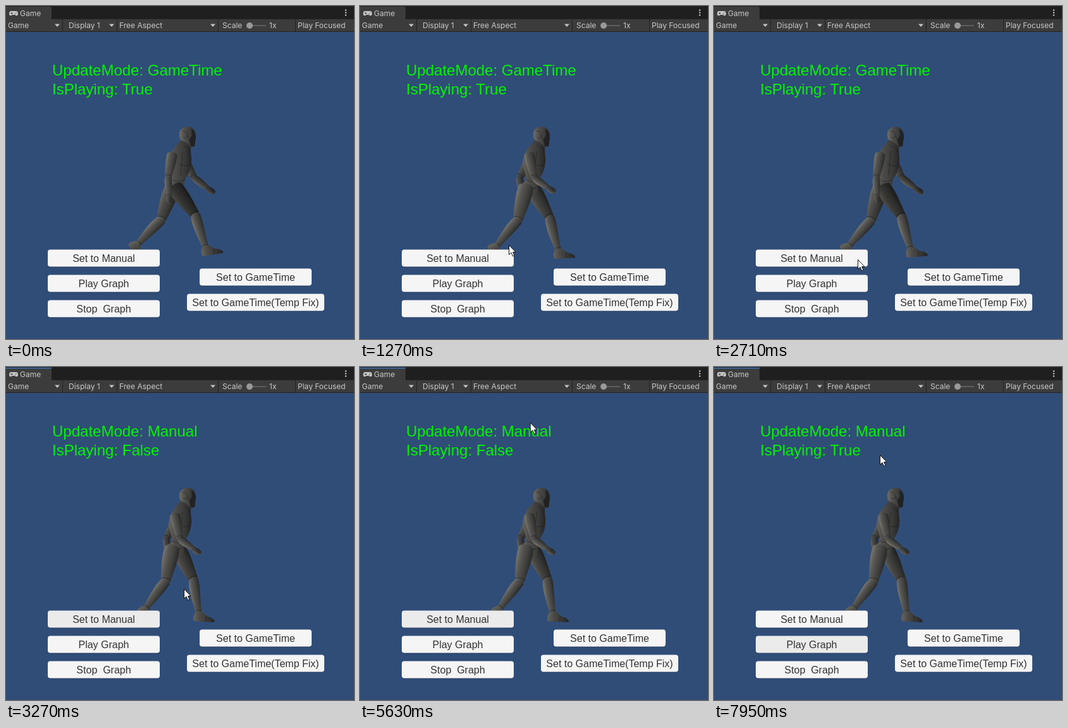
These frames come from a looping animation (550x527 px, 7990 ms). An HTML page:

```html
<!DOCTYPE html>
<html lang="en">
<head>
<meta charset="utf-8">
<title>Game view</title>
<style>
html, body { margin: 0; width: 100%; height: 100%; overflow: hidden; background: #304d78; }
svg { display: block; width: 100vw; height: 100vh; }
.ui { font: 12px Inter, Roboto, sans-serif; fill: #c8c8c8; }
.info { font: 24px "Liberation Sans", Arial, sans-serif; fill: #00f400; }
.btn text { font: 16px "Liberation Sans", Arial, sans-serif; fill: #323232; text-anchor: middle; white-space: pre; }
.crease { fill: none; stroke: #1d1d1d; stroke-width: 1; opacity: .55; }
</style>
</head>
<body>
<svg viewBox="0 0 550 527" preserveAspectRatio="none">
  <defs>
    <linearGradient id="skin">
      <stop offset="0" stop-color="#77766f"/><stop offset=".3" stop-color="#575652"/>
      <stop offset=".7" stop-color="#3e3e3c"/><stop offset="1" stop-color="#282828"/>
    </linearGradient>
    <linearGradient id="trunk">
      <stop offset="0" stop-color="#6e6d67"/><stop offset=".35" stop-color="#4d4c49"/>
      <stop offset=".75" stop-color="#383837"/><stop offset="1" stop-color="#242425"/>
    </linearGradient>
  </defs>

  <rect width="550" height="527" fill="#304d78"/>
  <rect width="550" height="20" fill="#1f1f1f"/>
  <path d="M0 20V1H69Q72 1 72 4V20Z" fill="#3c3c3c"/>
  <rect id="focus" y="1" width="72" height="1.5" fill="#3a72b0"/>
  <rect y="20" width="550" height="20.5" fill="#3c3c3c"/>
  <path d="M72 20.5H550M0 40.5H550M89.5 21V40M175.5 21V40M335.5 21V40M457.5 21V40" stroke="#232323"/>
  <path d="M8 8H16Q19 8 19 12T15.500 15L14 14H10L8.500 15Q5 16 5 12T8 8Z" fill="#c4c4c4"/>
  <path d="M7.500 11.500H10.500M9 10V13M14 12.500H15M15.500 10.500H16.500" stroke="#3c3c3c"/>
  <g fill="#c4c4c4">
    <circle cx="537" cy="6.500" r="1.200"/><circle cx="537" cy="10.500" r="1.200"/><circle cx="537" cy="14.500" r="1.200"/>
    <path d="M77 28.500h8l-4 4.500zM163 28.500h8l-4 4.500zM323 28.500h8l-4 4.500z"/>
  </g>
  <path d="M385 31H411" stroke="#5e5e5e" stroke-width="2"/>
  <circle cx="385" cy="31" r="5" fill="#999"/>
  <g class="ui">
    <text x="22" y="16">Game</text><text x="3" y="35">Game</text><text x="99" y="35">Display 1</text>
    <text x="179" y="35">Free Aspect</text><text x="342" y="35">Scale</text><text x="416" y="35">1x</text>
    <text x="461" y="35">Play Focused</text>
  </g>

  <g id="body"></g>
  <text id="mode" class="info" x="73" y="110"></text>
  <text id="playing" class="info" x="73" y="140"></text>
  <g id="buttons"></g>
  <path id="cursor" d="M.5 .5V15.500L4 12.300L6.600 18L9 17L6.500 11.500H11Z" fill="#fff" stroke="#111"/>
</svg>
<script>
const LOOP = 7990, START = 230, STEP = 40, CLICK = 2910, REPLAY = 7230;
const $ = id => document.getElementById(id);

function add(parent, tag, attrs = {}) {
  const el = document.createElementNS('http://www.w3.org/2000/svg', tag);
  for (const k in attrs) el.setAttribute(k, attrs[k]);
  return parent.appendChild(el);
}

// Linear interpolation in rows of [key, ...values]
function sample(rows, k) {
  let i = 1;
  while (i < rows.length - 1 && rows[i][0] < k) i++;
  const a = rows[i - 1], b = rows[i];
  const f = Math.min(1, Math.max(0, (k - a[0]) / (b[0] - a[0])));
  return a.slice(1).map((v, j) => v + (b[j + 1] - v) * f);
}

const SHAPES = {
  thigh: 'M-12 -5C-15 14 -9 36 -7 50Q0 57 8 50C9 36 14 14 11 -5Q0 -13 -12 -5Z',
  shin: 'M-7 -1C-11 14 -6 36 -4.500 53Q0 57 5 53C5 36 9 16 8 -1Q0 -8 -7 -1Z',
  foot: 'M-5 -4C-9 3 -10 12 -5 12L25 12.500C28 9 20 5 13 3L5 -4Z',
  upper: 'M-8 -4C-9 10 -6 24 -5 34Q0 39 5.500 34C6 24 9 10 8 -4Q0 -11 -8 -4Z',
  fore: 'M-5 0C-7 10 -4 20 -3 28H4C5 20 7 10 5.500 0Q0 -5 -5 0Z',
  hand: 'M-4 0C-6 6 -4 11 0 14L4 13Q6 9 5 5L4 0Z'
};
const CREASES = {
  thigh: 'M-7 47Q0 43 8 47', shin: 'M-5 50Q0 47 5 50', foot: 'M12 3L11 12',
  upper: 'M-5 31Q0 28 5 31', fore: 'M-3 26H4', hand: 'M1 5V12'
};

const body = $('body');
function limb(names) {
  return names.map(name => {
    const g = add(body, 'g');
    add(g, 'path', { d: SHAPES[name], fill: 'url(#skin)' });
    add(g, 'path', { d: CREASES[name], class: 'crease' });
    return g;
  });
}
const LEG = ['thigh', 'shin', 'foot'], ARM = ['hand', 'upper', 'fore'];
const farArm = limb(ARM), farLeg = limb(LEG);
add(body, 'path', {
  d: 'M278 211C267 221 258 233 257 248C258 261 264 268 262 276C255 282 252 288 253 297L279 299C282 290 280 281 284 272C292 262 295 246 292 232L292 219Z',
  fill: 'url(#trunk)'
});
add(body, 'path', { d: 'M280 221Q291 226 291 233M274 250Q284 256 291 250M263 275Q272 281 283 274M256 284Q268 294 280 286M279 230L276 268', class: 'crease' });
add(body, 'path', { d: 'M285 191C296 190 300 198 300 207L298 222L292 224C288 218 283 214 277 213C272 207 272 193 285 191Z', fill: 'url(#trunk)' });
add(body, 'path', { d: 'M293 195Q300 199 300 207L298 222L292 222L290 211L294 205Z', fill: '#222224' });
add(body, 'path', { d: 'M279 198Q287 198 287 206Q283 211 280 207M287 205L292 219', class: 'crease' });
const nearLeg = limb(LEG), nearArm = limb(ARM);

// Gait: [phase, thigh, shin, foot tilt], degrees, forward positive
const GAIT = [
  [0, 35, 18, -10], [.03, 29, 15, -4], [.055, 25, 9, 2], [.14, 21, -4, 0],
  [.3, 2, -8, 0], [.4, -12, -22, 10], [.5, -20, -44, 60], [.53, -15, -39, 55],
  [.64, -2, -26, 15], [.76, 24, -24, 5], [.88, 36, 5, -8], [1, 35, 18, -10]
];
const STRIDE = [[190, 0], [1270, 2.53], [2110, 4.64], [2710, 6.02], [CLICK, 6.555]];

function place(part, x, y, tilt, light = 1) {
  part.setAttribute('transform', `translate(${x.toFixed(2)} ${y.toFixed(2)}) rotate(${tilt.toFixed(2)})`);
  part.style.filter = `brightness(${light.toFixed(2)})`;
}
function reach(x, y, deg, len) {
  const a = deg * Math.PI / 180;
  return [x + Math.sin(a) * len, y + Math.cos(a) * len];
}
function poseLeg([thigh, shin, foot], x, y, phase, shade) {
  const [a, b, tilt] = sample(GAIT, phase % 1);
  const knee = reach(x, y, a, 51), ankle = reach(...knee, b, 54);
  place(thigh, x, y, -a, shade(a));
  place(shin, ...knee, -b);
  place(foot, ...ankle, tilt, .85);
}
function poseArm([hand, upper, fore], x, y, a, b, light) {
  const elbow = reach(x, y, a, 35), wrist = reach(...elbow, b, 27);
  place(upper, x, y, -a, light);
  place(fore, ...elbow, -b, light);
  place(hand, ...wrist, -b, light * .85);
}
function walk(phase) {
  const c = Math.cos(phase * 2 * Math.PI);
  poseLeg(nearLeg, 266 + 4 * c, 290, phase, a => 1 - Math.max(0, a) * .011);
  poseLeg(farLeg, 268.5 - 6.5 * c, 291, phase + .5, a => .9 - Math.max(0, a) * .004);
  poseArm(nearArm, 265 - 3 * c, 238, 1 - 11 * c, 29 - 26 * c, 1);
  poseArm(farArm, 275 + 5 * c, 242, -1 + 31 * c, 30 + 22 * c, .85);
}

const BUTTONS = [
  [66, 386, 177, 'Set to Manual'], [66, 426, 177, 'Play Graph'], [66, 466, 177, 'Stop\u00a0 Graph'],
  [306, 416, 177, 'Set to GameTime'], [286, 456, 217, 'Set to GameTime(Temp Fix)']
].map(([x, y, width, label]) => {
  const g = add($('buttons'), 'g', { class: 'btn' });
  add(g, 'rect', { x, y: y + .5, width, height: 27, rx: 4, fill: '#233a5c' });
  const face = add(g, 'rect', { x, y: y - .5, width, height: 27, rx: 4 });
  add(g, 'text', { x: x + width / 2, y: y + 19 }).textContent = label;
  return face;
});

// Pointer: [time, x, y]
const POINTER = [
  [230, 440, 0], [500, 350, 150], [800, 270, 310], [990, 250, 365], [1270, 235, 378],
  [1750, 227, 401], [3000, 227, 401], [3270, 281, 351], [3990, 281, 351], [4310, 225, 445],
  [4590, 225, 445], [4790, 377, 181], [5000, 310, 41], [5200, 205, 95], [5390, 215, 122],
  [5600, 260, 68], [5800, 318, 200], [5990, 240, 391], [6190, 281, 237], [6470, 218, 442],
  [7310, 218, 442], [7500, 262, 125], [7640, 308, 230], [7830, 230, 366], [7870, 290, 260], [7950, 262, 139]
];

const IDLE = '#f5f5f5', LIT = '#ebebeb', DOWN = '#c8c8c8';
const within = (t, from, to) => t >= from && t < to;

function render(ms) {
  const t = ms < START ? 0 : START + STEP * Math.floor((ms - START) / STEP);
  walk(sample(STRIDE, t)[0]);

  const [x, y] = sample(POINTER, t);
  $('cursor').setAttribute('transform', `translate(${x.toFixed(1)} ${y.toFixed(1)})`);
  $('cursor').style.display = t < START ? 'none' : '';

  const manual = t >= CLICK;
  $('mode').textContent = 'UpdateMode: ' + (manual ? 'Manual' : 'GameTime');
  $('playing').textContent = 'IsPlaying: ' + (manual && t < REPLAY ? 'False' : 'True');
  $('focus').style.display = t >= 2790 ? '' : 'none';

  const hover = within(t, 4190, 4670) || within(t, 6390, 7110);
  const faces = [
    within(t, 2790, CLICK) ? DOWN : within(t, CLICK, 7110) ? LIT : IDLE,
    within(t, 7110, REPLAY) ? DOWN : hover || t >= REPLAY ? LIT : IDLE
  ];
  BUTTONS.forEach((face, i) => face.setAttribute('fill', faces[i] || IDLE));
}

const begin = performance.now();
function tick() {
  render((performance.now() - begin) % LOOP);
  requestAnimationFrame(tick);
}
tick();
</script>
</body>
</html>
```
